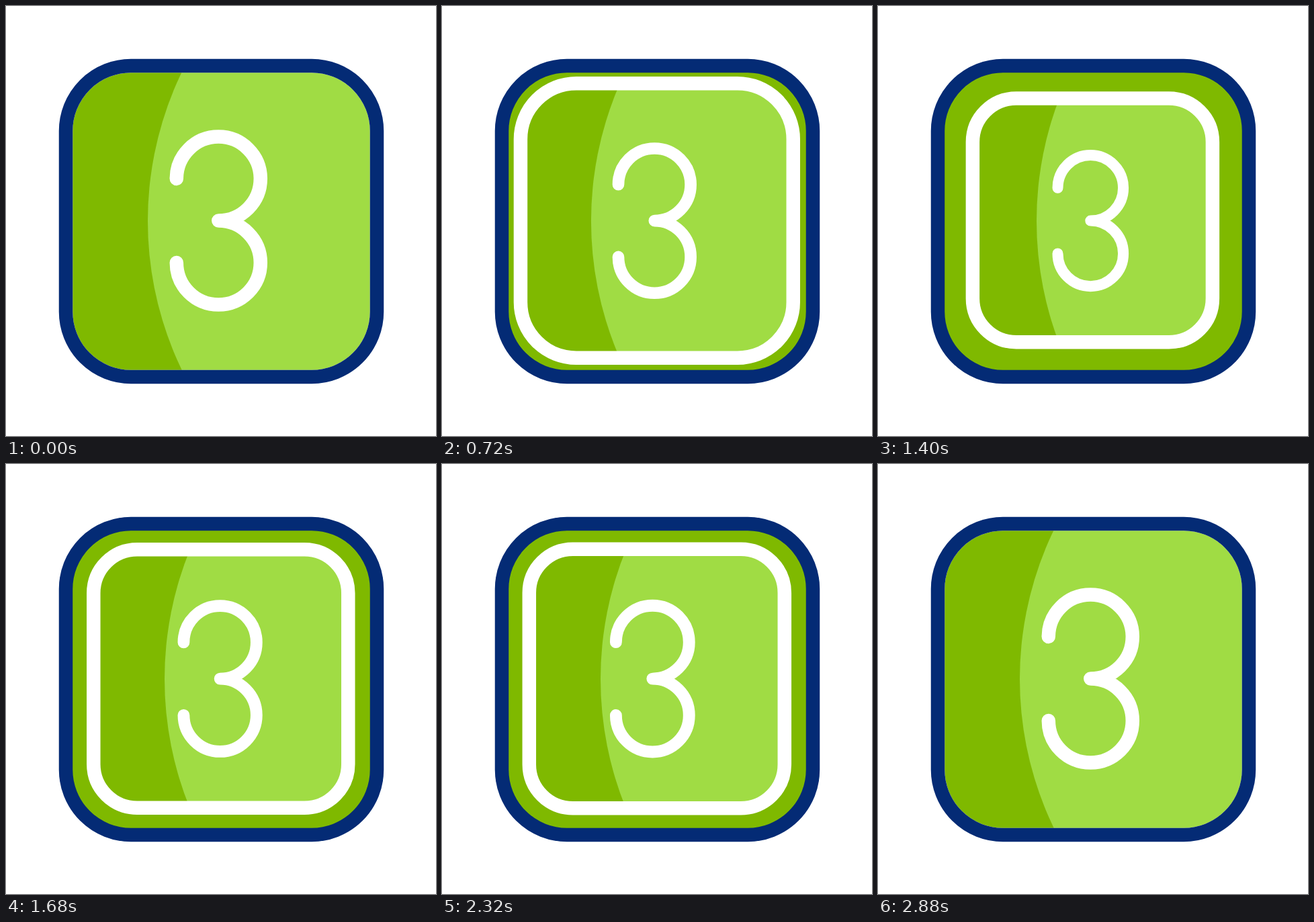
An HTML page for the animation above (3000 ms loop, 640 px wide and 640 px high).

```html
<!DOCTYPE html>
<html lang="en">
<head>
<meta charset="utf-8">
<title>Number three button</title>
<style>
  html, body { margin: 0; width: 100%; height: 100%; overflow: hidden; background: #fff; }
  svg { display: block; width: 100vw; height: 100vh; }
</style>
</head>
<body>
<svg viewBox="0 0 640 640" fill="none" stroke-width="20.5">
  <clipPath id="inside"><rect class="ring"/></clipPath>
  <rect x="89" y="89" width="463" height="463" rx="97" fill="#7fb900"/>
  <circle id="light" cy="320" r="510" fill="#a0dc44" clip-path="url(#inside)"/>
  <rect class="ring" stroke="#fff"/>
  <path id="digit" stroke="#fff" stroke-linecap="round" stroke-linejoin="round"
    d="M-62.5-62.5A62.5 62.5 0 1 1 0 0A62.5 62.5 0 1 1 -62.5 62.5"/>
  <rect x="89" y="89" width="463" height="463" rx="97" stroke="#042b75"/>
</svg>
<script>
const LOOP = 3000, STEP = 40;
const rings = document.querySelectorAll('.ring');
const light = document.getElementById('light');
const digit = document.getElementById('digit');

const smooth = p => p * p * (3 - 2 * p);

// Eased value at time t from a list of times and a list of values.
function tween(t, times, values) {
  const i = times.findIndex(time => t < time);
  if (i === 0) return values[0];
  if (i < 0) return values[values.length - 1];
  const p = smooth((t - times[i - 1]) / (times[i] - times[i - 1]));
  return values[i - 1] + (values[i] - values[i - 1]) * p;
}

const PRESS = [450, 1040, 1740, 2350, 2870];
const SHAKE = [1660, 1865, 2080, 2350];

function draw(now) {
  const t = Math.floor(now % LOOP / STEP) * STEP;
  const press = (full, low, rest) => tween(t, PRESS, [full, low, rest, rest, full]);

  const cx = press(320.5, 319, 319.8), cy = press(320.5, 318.2, 319.5);
  const w = press(231.5, 166, 190), h = press(231.5, 169, 192.7);
  const box = { x: cx - w, y: cy - h, width: 2 * w, height: 2 * h, rx: press(97, 65, 65) };
  for (const ring of rings)
    for (const name in box) ring.setAttribute(name, box[name]);

  light.setAttribute('cx', press(721, 746, 746));

  const x = 316.3 + tween(t, SHAKE, [0, 87, -87, 0]);
  digit.setAttribute('transform', `translate(${x} 319.6) scale(${press(1, 0.682, 0.871)})`);
}

const start = performance.now();
function tick() {
  draw(performance.now() - start);
  requestAnimationFrame(tick);
}
tick();
</script>
</body>
</html>
```
